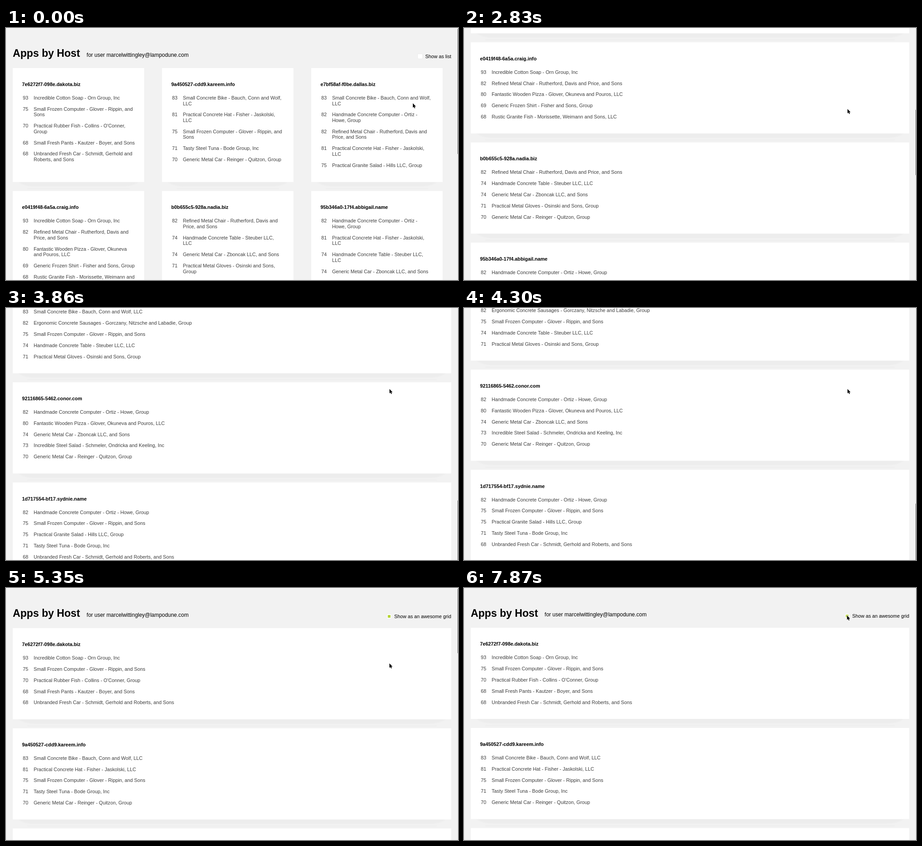
Recreate the animation shown at these times as an HTML page with a canvas. Size 1001x560 px, loop 8000 ms.

```html
<!DOCTYPE html>
<html lang="en">
<head>
<meta charset="utf-8">
<title>Apps by Host</title>
<style>
html, body { margin: 0; width: 100%; height: 100%; overflow: hidden; background: #fff; }
canvas { display: block; }
</style>
</head>
<body>
<canvas id="stage" width="1001" height="560"></canvas>
<script>
const W = 1001, H = 560, LOOP = 8000, STEP = 148.2;
const ctx = document.getElementById('stage').getContext('2d');
const FONT = '"Liberation Sans", Arial, sans-serif';

// '|' marks the line break used in the narrow grid cards
const APPS = {
  soap: 'Incredible Cotton Soap - Orn Group, Inc',
  frozen: 'Small Frozen Computer - Glover - Rippin, and|Sons',
  fish: "Practical Rubber Fish - Collins - O'Conner,|Group",
  pants: 'Small Fresh Pants - Kautzer - Boyer, and Sons',
  car: 'Unbranded Fresh Car - Schmidt, Gerhold and|Roberts, and Sons',
  bike: 'Small Concrete Bike - Bauch, Conn and Wolf,|LLC',
  hat: 'Practical Concrete Hat - Fisher - Jaskolski,|LLC',
  tuna: 'Tasty Steel Tuna - Bode Group, Inc',
  reinger: 'Generic Metal Car - Reinger - Quitzon, Group',
  ortiz: 'Handmade Concrete Computer - Ortiz -|Howe, Group',
  chair: 'Refined Metal Chair - Rutherford, Davis and|Price, and Sons',
  granite: 'Practical Granite Salad - Hills LLC, Group',
  pizza: 'Fantastic Wooden Pizza - Glover, Okuneva|and Pouros, LLC',
  shirt: 'Generic Frozen Shirt - Fisher and Sons, Group',
  rustic: 'Rustic Granite Fish - Morissette, Weimann and|Sons, LLC',
  table: 'Handmade Concrete Table - Steuber LLC,|LLC',
  zboncak: 'Generic Metal Car - Zboncak LLC, and Sons',
  gloves: 'Practical Metal Gloves - Osinski and Sons,|Group',
  sausage: 'Ergonomic Concrete Sausages - Gorczany,|Nitzsche and Labadie, Group',
  steel: 'Incredible Steel Salad - Schmeler, Ondricka|and Keeling, Inc'
};

const HOSTS = [
  ['7e6272f7-098e.dakota.biz', '93 soap,75 frozen,70 fish,68 pants,68 car'],
  ['9a450527-cdd9.kareem.info', '83 bike,81 hat,75 frozen,71 tuna,70 reinger'],
  ['e7bf58af-f0be.dallas.biz', '83 bike,82 ortiz,82 chair,81 hat,75 granite'],
  ['e0419f48-6a5a.craig.info', '93 soap,82 chair,80 pizza,69 shirt,68 rustic'],
  ['b0b655c5-928a.nadia.biz', '82 chair,74 table,74 zboncak,71 gloves,70 reinger'],
  ['95b346a0-17f4.abbigail.name', '82 ortiz,81 hat,74 table,74 zboncak,71 tuna'],
  ['128406fc-0d3f.tiana.biz', '82 ortiz,80 pizza,75 frozen,74 table,74 zboncak'],
  ['2b4cfcf7-81d5.kelli.org', '83 bike,82 sausage,75 frozen,74 table,71 gloves'],
  ['92116865-5462.conor.com', '82 ortiz,80 pizza,74 zboncak,73 steel,70 reinger'],
  ['1d717554-bf17.sydnie.name', '82 ortiz,75 frozen,75 granite,71 tuna,68 car']
].map(([name, apps]) => ({
  name,
  apps: apps.split(',').map(a => {
    const [score, key] = a.split(' ');
    return { score, text: APPS[key] };
  })
}));

const TOP = 88.4, GAP = 20, LINE = 12.6, ITEM = 24.8;
const LIST = { cols: 1, w: 971, h: 202.6, thumb: 145 };
const GRID = { cols: 3, w: 291, h: 253.3, thumb: 280 };

const clamp = v => Math.max(0, Math.min(1, v));
const smooth = u => u * u * (3 - 2 * u);
const ramp = (k, a, b) => clamp((k - a) / (b - a));

function text(s, x, y, size, color = '#3d3d3d', weight = 'normal', align = 'left') {
  ctx.font = `${weight} ${size}px ${FONT}`;
  ctx.textAlign = align;
  ctx.fillStyle = color;
  ctx.fillText(s, x, y);
}

function box(x, y, w, h, color) {
  ctx.fillStyle = color;
  ctx.fillRect(x, y, w, h);
}

function shadow(x, y, w) {
  const strip = (inset, depth, color) => {
    ctx.fillStyle = color;
    ctx.beginPath();
    ctx.moveTo(x + inset, y);
    ctx.quadraticCurveTo(x + inset + 12, y + depth, x + inset + 36, y + depth);
    ctx.lineTo(x + w - inset - 36, y + depth);
    ctx.quadraticCurveTo(x + w - inset - 12, y + depth, x + w - inset, y);
    ctx.fill();
  };
  box(x + 32, y + 13, w - 64, 3, '#efefef');
  strip(12, 10.5, '#efefef');
  strip(16, 9, '#ededed');
}

function card(host, x, y, view) {
  shadow(x, y + view.h, view.w);
  box(x, y, view.w, view.h, '#fff');
  text(host.name, x + 20.4, y + 40, 10.85, '#000', 'bold');
  let base = y + 70;
  for (const app of host.apps) {
    const lines = view === GRID ? app.text.split('|') : [app.text.replace('|', ' ')];
    text(app.score, x + 22.2, base, 10.8);
    lines.forEach((s, i) => text(s, x + 46.2, base + i * LINE, 10.8));
    base += ITEM + (lines.length - 1) * LINE;
  }
}

function toggle(x, y, on) {
  ctx.beginPath();
  ctx.roundRect(x - 5.5, y - 5.5, 11, 11, 2);
  ctx.fillStyle = '#fff';
  ctx.fill();
  ctx.lineWidth = 0.6;
  ctx.strokeStyle = '#e2e2e2';
  ctx.stroke();
  if (on) box(x - 3, y - 3, 6, 6, '#b5d334');
}

function page(view, scroll) {
  box(0, 0, W, H, '#fff');
  box(0, -Math.min(scroll, 0), W, H, '#f2f2f2');
  const list = view === LIST;
  text('Apps by Host', 15, 63.6 - scroll, 23.1, '#000', 'bold');
  text('for user marcelwittingley@lampodune.com', 178.6, 63.4 - scroll, 11.95, '#000');
  text(list ? 'Show as an awesome grid' : 'Show as list', 986, 66.2 - scroll, 10.78, '#000', 'normal', 'right');
  toggle(list ? 848.5 : 917, 62.3 - scroll, list);
  HOSTS.forEach((host, i) => {
    const x = 15 + (i % view.cols) * 330.5;
    const y = TOP + Math.floor(i / view.cols) * (view.h + GAP) - scroll;
    if (y < H && y + view.h + GAP > 0) card(host, x, y, view);
  });
}

function scrollbar(view, scroll, alpha) {
  if (alpha <= 0) return;
  const y = scroll * 0.251, top = Math.max(2, y);
  box(1000, top, 1, y + view.thumb - top, `rgba(0,0,0,${0.55 * alpha})`);
}

const ARROW = [[0, 0], [0, 9.8], [2.2, 7.8], [3.7, 11.2], [5.3, 10.5], [3.9, 7.2], [6.8, 7.2]];

function cursor(x, y) {
  ctx.beginPath();
  ARROW.forEach(([dx, dy]) => ctx.lineTo(x + dx, y + dy));
  ctx.closePath();
  ctx.lineJoin = 'round';
  ctx.lineWidth = 1.4;
  ctx.strokeStyle = '#fff';
  ctx.stroke();
  ctx.fillStyle = '#000';
  ctx.fill();
}

// Pointer legs: first step, last step, end point
const LEGS = [
  [0, 6, 914, 63.2],
  [12, 16, 849.3, 180],
  [35, 40, 847.8, 60.8],
  [42, 46, 918, 62],
  [48, 53, 848.3, 61]
];

function pointer(k) {
  let x = 901, y = 167.2;
  for (const [a, b, tx, ty] of LEGS) {
    const u = smooth(ramp(k, a, b));
    x += (tx - x) * u;
    y += (ty - y) * u;
  }
  return [x, y];
}

function scrollAt(k) {
  const end = 1732.3, pull = -12.5;
  if (k < 1) return -0.6;
  if (k <= 29) return end * (1 - Math.pow(1 - ramp(k, 17, 29), 2.971));
  if (k <= 33) return end + (pull - end) * smooth(ramp(k, 29, 33));
  return pull * Math.pow(1 - ramp(k, 33, 37), 2);
}

function barAlpha(k) {
  if (k < 17) return 1 - ramp(k, 2, 5);
  return k < 18 ? 0 : 1 - ramp(k, 37, 40);
}

function draw(now) {
  const k = Math.floor((now % LOOP) / STEP);
  const view = (k >= 11 && k < 41) || k >= 48 ? LIST : GRID;
  const scroll = scrollAt(k);
  page(view, scroll);
  scrollbar(view, scroll, barAlpha(k));
  cursor(...pointer(k));
}

const start = performance.now();
function loop() {
  draw(performance.now() - start);
  requestAnimationFrame(loop);
}
loop();
</script>
</body>
</html>
```
